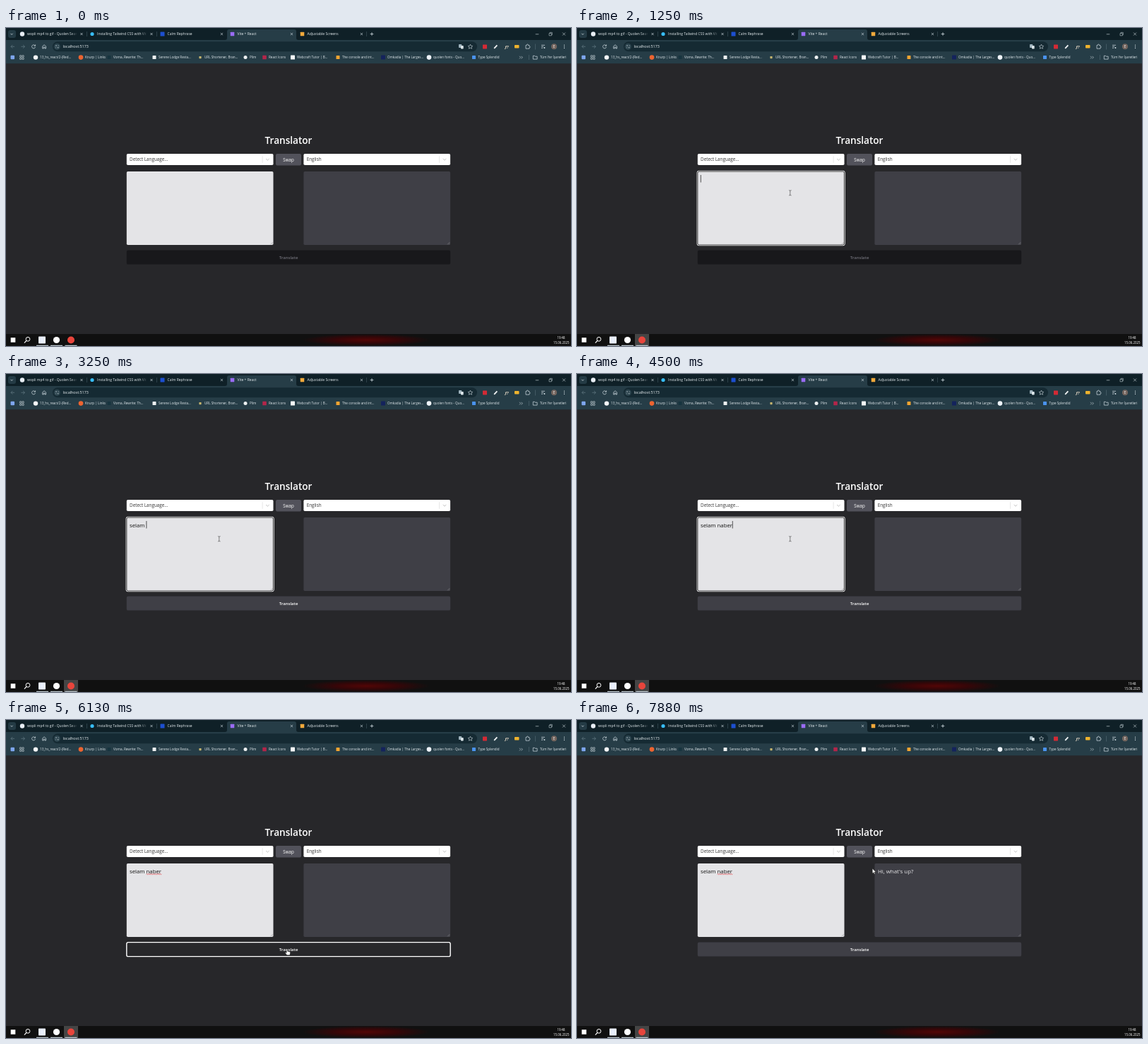
An HTML page that plays this animation: 800 by 450 pixels, repeating every 8 s.

```html
<!DOCTYPE html>
<html lang="en">
<head>
<meta charset="utf-8">
<title>Translator</title>
<style>
  html, body { margin: 0; width: 100%; height: 100%; overflow: hidden; background: #27272a; }
  svg { display: block; width: 100vw; height: 100vh; }
  text { font-family: "Open Sans", "Noto Sans", sans-serif; white-space: pre; }
</style>
</head>
<body>
<svg id="stage" viewBox="0 0 800 450" xmlns="http://www.w3.org/2000/svg"></svg>
<script>
const LOOP = 8000, STEP = 125;
const STRIP = '#0f2027', BAR = '#263d47', PALE = '#d5e0e5';

const rect = (x, y, w, h, fill, r = 0, more = '') =>
  `<rect x="${x}" y="${y}" width="${w}" height="${h}" rx="${r}" fill="${fill}" ${more}/>`;
const dot = (x, y, r, fill) => `<circle cx="${x}" cy="${y}" r="${r}" fill="${fill}"/>`;
const box = (x, y, s, fill, r = 0.6) => rect(x - s / 2, y - s / 2, s, s, fill, r);
const line = (d, color, w = 0.8, more = '') =>
  `<path d="${d}" fill="none" stroke="${color}" stroke-width="${w}" ${more}/>`;
const label = (x, y, s, size, fill, more = '') =>
  `<text x="${x}" y="${y}" font-size="${size}" fill="${fill}" ${more}>${s}</text>`;
const mid = 'text-anchor="middle"';
const cross = (x, y, r, w) =>
  line(`M${x - r} ${y - r}l${2 * r} ${2 * r}m0 ${-2 * r}l${-2 * r} ${2 * r}`, PALE, w);

function tabStrip() {
  const tabs = [
    [23, dot, 3.2, '#e8eef5', 'wopli mp4 to gif - Quolen Searc'],
    [122, dot, 2.6, '#38bdf8', 'Installing Tailwind CSS with Vit'],
    [221.5, box, 6, '#1d4fd0', 'Calm Rephrase'],
    [320.5, box, 5.5, '#9a6cf5', 'Vite + React'],
    [419.5, box, 5.5, '#f2a93b', 'Adjustable Screens']
  ];
  let s = rect(0, 0, 800, 17, STRIP) + rect(3, 3, 11, 11, '#243b45', 3)
    + line('M6.5 7.8l1.6 1.6 1.6-1.6', PALE)
    + `<path d="M310 17q3 0 3-3V5q0-3 3-3h92q3 0 3 3v9q0 3 3 3z" fill="${BAR}"/>`;
  for (const [x, shape, size, color, title] of tabs) {
    s += shape(x, 8.5, size, color) + label(x + 7, 10.3, title, 5, '#e6edf0')
      + cross(x + 84, 8.5, 1.6, 0.7);
  }
  for (const x of [23, 122]) s += rect(x + 68, 3, 10, 11, 'url(#fade)') + rect(x + 78, 3, 4, 11, STRIP);
  for (const x of [114, 213, 510]) s += rect(x, 5, 0.5, 7, '#4b626c');
  return s + line('M515.7 8.5h4.6M518 6.2v4.6', PALE)
    + line('M749.7 8.8h4.6', PALE, 0.6)
    + line('M769 7.5h3.3v3.3h-3.3zM770 7.3v-1h3.3v3.3h-1', PALE, 0.5) + cross(790, 8.5, 2, 0.6);
}

function toolbar() {
  const dim = '#5f7680';
  let s = rect(0, 17, 800, 33.5, BAR) + rect(66, 19.3, 601, 14, '#152a33', 7);
  s += line('M12 26.3H7M9.3 24l-2.3 2.3 2.3 2.3', dim) + line('M21.5 26.3h5M24.2 24l2.3 2.3-2.3 2.3', dim)
    + line('M41.2 25A2.5 2.5 0 1 0 41.5 27M41.6 23.4v2h-2', PALE, 0.7)
    + line('M51.7 29v-3.2l2.4-2 2.4 2V29h-1.6v-2h-1.6v2z', PALE, 0.7)
    + dot(72.3, 26.3, 4.6, '#2c444e')
    + line('M70 25h2.2M73.8 25h1M70 27.8h.8M72.5 27.8h2.3', PALE, 0.7)
    + label(80.5, 28.2, 'localhost:5173', 5.4, '#f0f5f7');
  s += rect(641, 23, 4.3, 5, '#9fb3bd', 0.7) + rect(644, 25, 3.7, 4.5, '#dce6ea', 0.7)
    + line('M657.5 23.2l1 2 2.2.3-1.6 1.5.4 2.2-2-1.1-2 1.1.4-2.2-1.6-1.5 2.2-.3z', PALE, 0.6);
  s += box(678, 26.4, 6, '#d42a35') + line('M691.2 28.8l4.2-4.4', '#f2f5f6', 1.8)
    + label(709, 28.5, 'f?', 6, '#e9dcc8', mid + ' font-style="italic" font-weight="700"')
    + rect(720, 24, 6.5, 4.6, '#f0b32d', 0.8)
    + line('M736 24.4h1.4q0-1.4 1-1.4t1 1.4h1.5v1.5q1.2 0 1.2 1t-1.2 1v1.3H736z', PALE, 0.7)
    + rect(749, 22.5, 0.5, 8, dim)
    + line('M758 24.3h5M758 26.3h3M758 28.3h2', PALE, 0.7) + dot(762.4, 28, 1, PALE)
    + dot(776, 26.3, 4, '#75665f') + label(776, 28, 'E', 4.5, '#fff', mid);
  for (const y of [24.2, 26.3, 28.4]) s += dot(790.5, y, 0.6, PALE);
  return s;
}

function bookmarks() {
  const marks = [
    [42, dot, 3.2, '#f5f7f8', '13_hs_react/2-(Red...'],
    [106, dot, 3.3, '#ec6430', 'Knurp | Links'],
    [146, box, 5, '#17343f', 'Vorna, Rewrite: Th...'],
    [210, box, 5, '#eef1f2', 'Serene Lodge Resta...'],
    [275, box, 3.2, '#c5b46e', 'URL Shortener, Bran...'],
    [339, dot, 2.5, '#eef1f2', 'Plim'],
    [366, box, 5.5, '#b3264a', 'React Icons'],
    [406, box, 6, '#f5f7f8', 'Webcraft Tutor | B...'],
    [470, box, 5, '#f0a431', 'The console and int...'],
    [534, box, 6, '#14235c', 'Omkadia | The Larges...'],
    [599, dot, 3.3, '#eef3f8', 'quolen fonts - Quo...'],
    [662.5, box, 5, '#4a93ee', 'Type Splendid']
  ];
  let s = box(9.3, 41.6, 5.5, '#7ea6ee', 1);
  for (const x of [19.6, 22.9]) for (const y of [38.8, 42.1])
    s += rect(x, y, 2.3, 2.3, 'none', 0.2, `stroke="${PALE}" stroke-width=".6"`);
  for (const [x, shape, size, color, name] of marks)
    s += shape(x, 41.6, size, color) + label(x + 6, 43.3, name, 4.6, '#e0e8ec');
  return s + line('M727 39.8l1.8 1.8-1.8 1.8M729.6 39.8l1.8 1.8-1.8 1.8', PALE, 0.6)
    + rect(740, 38, 0.5, 7, '#5f7680')
    + line('M746.3 39.3h2l.8.9h3v3.9h-5.8z', PALE, 0.7)
    + label(756, 43.3, 'Tüm Yer İşaretleri', 4.6, '#e0e8ec');
}

function selectBox(x, value) {
  return rect(x, 178, 207.7, 16, '#fff', 1.8) + label(x + 4.3, 188.3, value, 6.3, '#333')
    + rect(x + 192, 181.3, 0.5, 9.5, '#ccc')
    + line(`M${x + 197.3} 185l2.3 2.2 2.3-2.2`, '#bbb', 0.9);
}

function textArea(x, fill, grip) {
  return rect(x, 203, 207.7, 104, fill, 1.8)
    + line(`M${x + 203.7} 306.3l3.3-3.3M${x + 205.7} 306.3l1.3-1.3`, grip, 0.4);
}

function page() {
  return rect(0, 50.5, 800, 382.5, '#27272a')
    + label(400, 164, 'Translator', 13.6, '#fff', mid + ' font-weight="600"')
    + selectBox(170.8, 'Detect Language...') + selectBox(421.4, 'English')
    + rect(382, 178, 36, 16.5, '#52525b', 2)
    + label(400, 188.6, 'Swap', 6.2, '#fff', mid + ' font-weight="500"')
    + textArea(170.8, '#e4e4e7', '#777') + textArea(421.4, '#3f3f46', '#aaa')
    + '<g id="focus">' + rect(170.1, 202.3, 209.1, 105.4, 'none', 2.2, 'stroke="#fff" stroke-width="1"')
    + rect(170.9, 203.1, 207.5, 103.8, 'none', 1.8, 'stroke="#101010" stroke-width=".7"') + '</g>'
    + label(175, 216.5, '', 7.78, '#111', 'id="typed"')
    + '<path id="caret" stroke="#111" stroke-width=".7"/>'
    + line('M198.7 218.2' + 'q.6 -1 1.2 0t1.2 0'.repeat(9), '#e0262d', 0.7, 'id="wavy"')
    + label(425.9, 216.5, "Hi, what's up?", 7.9, '#e4e4e7', 'id="answer"')
    + rect(170.8, 314.6, 458.4, 20, '#18181b', 2.2, 'id="button"')
    + label(400, 326.9, 'Translate', 6, '#fff', mid + ' font-weight="600" id="caption"');
}

function taskbar() {
  let s = rect(0, 433, 800, 17, '#101010') + rect(420, 433, 180, 17, 'url(#glow)')
    + rect(82, 433, 20, 17, '#454545', 0, 'id="active"')
    + box(10, 441.5, 6.6, '#fff', 0)
    + `<circle cx="31" cy="440.3" r="2.9" fill="none" stroke="#fff" stroke-width="1"/>`
    + line('M28.9 442.5l-3 3.1', '#fff', 1.1)
    + box(51, 441.5, 10, '#e9effb', 0.8) + dot(71.5, 441.5, 4.6, '#fff') + dot(92, 441.5, 5, '#e8453c');
  for (const x of [43, 63, 83.5]) s += rect(x, 448.8, 17, 1.2, '#b9c4cb');
  return s + label(786, 439.6, '19:48', 4.4, '#fff', mid) + label(786.3, 447.3, '15.06.2025', 4.4, '#fff', mid);
}

function pointers() {
  const ink = 'stroke="#111" stroke-width=".5" stroke-linejoin="round"';
  return '<g id="pointer">'
    + `<path id="arrow" d="M0 0v7.2l1.7-1.5 1.1 2.6 1.2-.5-1.1-2.5h2.2z" fill="#fff" ${ink}/>`
    + line('M-1.7 -3.6q1.7 0 1.7.8v5.6q0 .8-1.7.8M1.7 -3.6q-1.7 0-1.7.8M0 2.8q0 .8 1.7.8', '#333', 0.6, 'id="beam"')
    + `<path id="hand" d="M-.8 .7q.8-1.4 1.6 0v2.6l3 .7q.9.3.8 1.3l-.7 3.5h-4.2l-2.4-3.4q-.1-1 .9-.7l1 .8z" fill="#fff" ${ink}/>`
    + '</g>';
}

const stage = document.getElementById('stage');
stage.innerHTML = `<defs>
  <linearGradient id="fade"><stop stop-color="${STRIP}" stop-opacity="0"/><stop offset="1" stop-color="${STRIP}"/></linearGradient>
  <radialGradient id="glow"><stop stop-color="#520606"/><stop offset=".5" stop-color="#350608"/><stop offset="1" stop-color="#101010"/></radialGradient>
</defs>` + tabStrip() + toolbar() + bookmarks() + page() + taskbar() + pointers();

const el = id => document.getElementById(id);
const show = (id, on) => el(id).setAttribute('visibility', on ? 'visible' : 'hidden');
const set = (id, attrs) => { for (const k in attrs) el(id).setAttribute(k, attrs[k]); };

const phrase = 'selam naber';
const keyTimes = [2000, 2200, 2400, 2600, 2800, 3050, 3500, 3700, 3950, 4150, 4375];
const route = [[125, 430, 436], [750, 301.8, 233.3], [5000, 301.8, 233.3], [5500, 398, 324], [7500, 398, 324], [7875, 418.2, 210]];
const FOCUS = 750, CLICK = 5750, REPLY = 6750;

function place(t) {
  for (let i = 1; i < route.length; i++) {
    const [t0, x0, y0] = route[i - 1], [t1, x1, y1] = route[i];
    if (t > t1) continue;
    const u = Math.max(0, (t - t0) / (t1 - t0)), k = u * u * (3 - 2 * u);
    return [x0 + (x1 - x0) * k, y0 + (y1 - y0) * k];
  }
  return route[route.length - 1].slice(1);
}

function draw(time) {
  const t = Math.floor(time / STEP) * STEP;
  const count = keyTimes.filter(k => k <= t).length;
  const [x, y] = place(t);
  const focused = t >= FOCUS && t < CLICK;
  const inside = (l, r, top, bottom) => x > l && x < r && y > top && y < bottom;
  const overText = inside(171, 378, 203, 307) || inside(422, 629, 203, 307);
  const overButton = inside(171, 629, 314, 335);
  const ready = count > 0, hover = ready && overButton;

  show('active', t >= FOCUS);
  show('focus', focused);
  el('typed').textContent = phrase.slice(0, count);
  const lastInput = count ? keyTimes[count - 1] : FOCUS;
  const blinkOn = Math.floor((t - lastInput) / 530) % 2 === 0 || (t >= 4375 && t < 5000);
  show('caret', focused && blinkOn);
  const caretX = 175.3 + (count ? el('typed').getComputedTextLength() : 0);
  set('caret', { d: `M${caretX} 208v10.5` });
  show('wavy', t >= CLICK);
  show('answer', t >= REPLY);

  set('button', hover
    ? { fill: '#27272a', stroke: '#fff', 'stroke-width': 1.4 }
    : { fill: ready ? '#3f3f46' : '#18181b', stroke: 'none' });
  set('caption', { fill: ready ? '#fff' : '#71717a' });

  const kind = t < 125 ? '' : overText ? 'beam' : hover ? 'hand' : 'arrow';
  for (const id of ['arrow', 'beam', 'hand']) show(id, id === kind);
  set('pointer', { transform: `translate(${x} ${y})` });
}

const start = performance.now();
function tick() {
  draw((performance.now() - start) % LOOP);
  requestAnimationFrame(tick);
}
tick();
</script>
</body>
</html>
```
